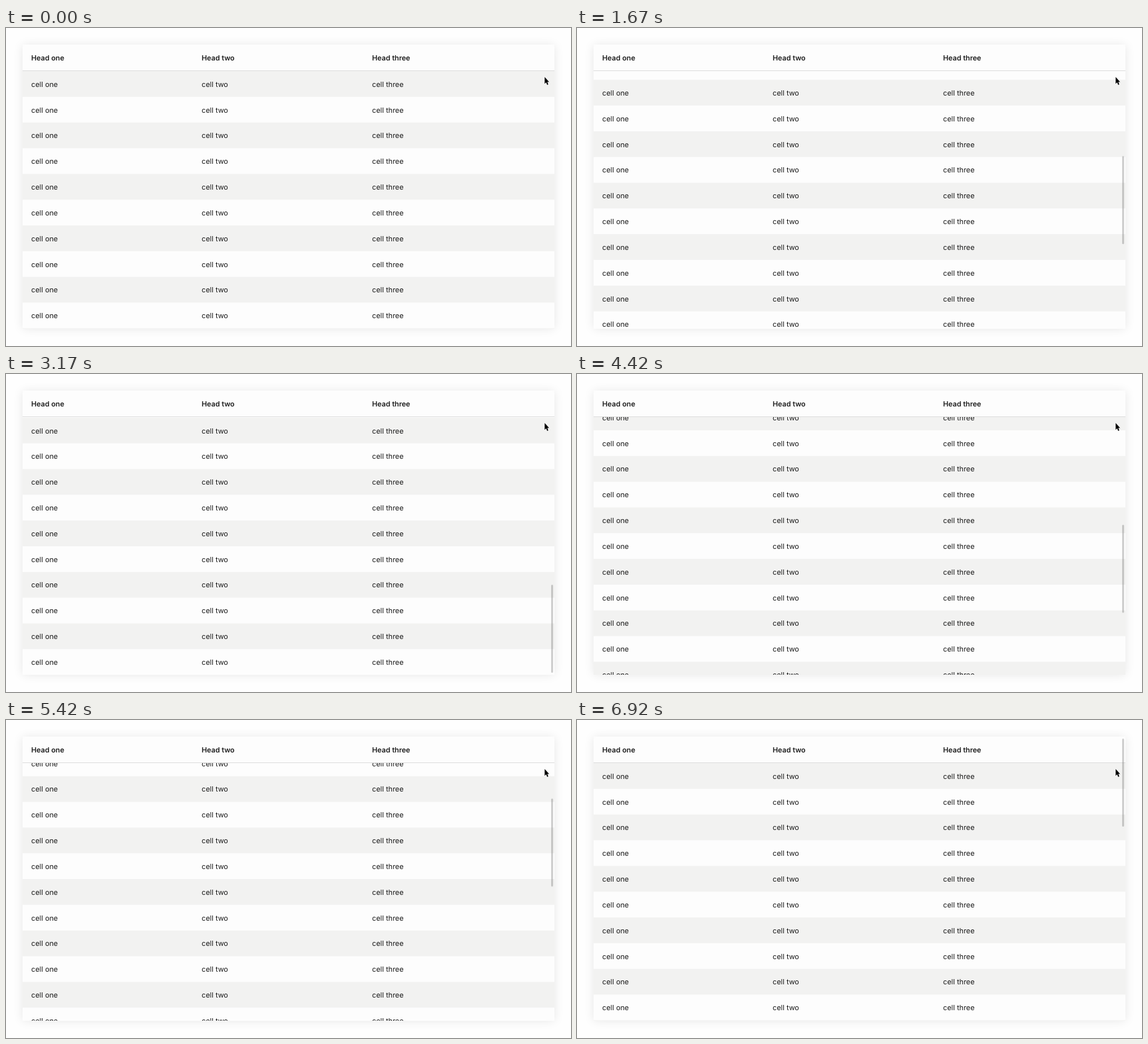
These frames come from a looping animation (852 px wide and 480 px high, 7.01 s). An HTML page:

```html
<!DOCTYPE html>
<html lang="en">
<head>
<meta charset="utf-8">
<title>Sticky table header</title>
<style>
  html, body { margin: 0; width: 100%; height: 100%; overflow: hidden; background: #fefefe; }
  svg { display: block; width: 100vw; height: 100vh; }
  text { font: 10.9px Inter, "Open Sans", sans-serif; fill: #1c1c1c; text-rendering: geometricPrecision; }
  .head text { font-size: 10.8px; font-weight: 600; }
</style>
</head>
<body>
<svg viewBox="0 0 852 480">
  <defs>
    <filter id="blur" x="-10%" y="-10%" width="120%" height="120%">
      <feGaussianBlur stdDeviation="8"/>
    </filter>
    <clipPath id="body"><rect x="25" y="64" width="802" height="390"/></clipPath>
  </defs>
  <rect width="852" height="480" fill="#fefefe"/>
  <rect x="25" y="26" width="802" height="428" opacity=".09" filter="url(#blur)"/>
  <rect x="25" y="25" width="802" height="429" fill="#fdfdfd"/>
  <g clip-path="url(#body)"><g id="rows"></g></g>
  <g class="head" id="head">
    <rect x="25" y="25" width="802" height="39" fill="#fdfdfd"/>
    <rect x="25" y="64" width="802" height="1" fill="#dedede"/>
  </g>
  <rect id="thumb" x="822" width="3" height="133" rx="1.5" opacity=".18"/>
  <path d="M812.3 74v10.2l2.2-2.1 1.6 3.8 1.7-.8-1.6-3.6h2.9Z" stroke="#fff" stroke-width=".8" paint-order="stroke"/>
</svg>
<script>
  const LOOP = 7010, STEP = 1000 / 12;
  const ROWS = 34, PITCH = 38.83, TOP = 65, MAX = 931.1;
  const COLUMNS = [[38, "one"], [295, "two"], [552, "three"]];

  // Scroll path: time in ms, offset in px, speed in px per ms
  const DOWN = 0.3594, UP = -0.3493;
  const KEYS = [
    [191, 0, DOWN], [2500, 829.9, DOWN], [3170, MAX, 0],
    [3230, MAX, 0], [3880, 827.6, UP], [5950, 104.6, UP], [6700, 0, 0]
  ];

  const $ = id => document.getElementById(id);

  function add(parent, tag, attrs, content = "") {
    const el = document.createElementNS("http://www.w3.org/2000/svg", tag);
    for (const name in attrs) el.setAttribute(name, attrs[name]);
    el.textContent = content;
    parent.append(el);
  }

  function addLabels(parent, word, y) {
    for (const [x, label] of COLUMNS) add(parent, "text", { x, y }, `${word} ${label}`);
  }

  // Cubic Hermite curve through the keys
  function scrollAt(t) {
    const i = KEYS.findIndex(key => key[0] >= t);
    if (i < 1) return 0;
    const [t0, p0, v0] = KEYS[i - 1], [t1, p1, v1] = KEYS[i];
    const d = t1 - t0, u = (t - t0) / d, w = 1 - u;
    return p0 * w * w * (1 + 2 * u) + v0 * d * u * w * w
         + p1 * u * u * (3 - 2 * u) - v1 * d * u * u * w;
  }

  function draw(ms) {
    const step = Math.floor((ms % LOOP + 5) / STEP);
    const y = scrollAt(step * STEP);
    $("rows").setAttribute("transform", `translate(0 ${-y})`);
    $("thumb").setAttribute("y", 28 + 290 * y / MAX);
    $("thumb").setAttribute("visibility", step < 3 ? "hidden" : "visible");
  }

  for (let i = 0; i < ROWS; i++) {
    const y = TOP + i * PITCH;
    if (i % 2 === 0) add($("rows"), "rect", { x: 25, y, width: 802, height: PITCH, fill: "#f2f2f1" });
    addLabels($("rows"), "cell", y + 23.7);
  }
  addLabels($("head"), "Head", 49);

  const start = performance.now();
  function tick() {
    draw(performance.now() - start);
    requestAnimationFrame(tick);
  }
  tick();
</script>
</body>
</html>
```
